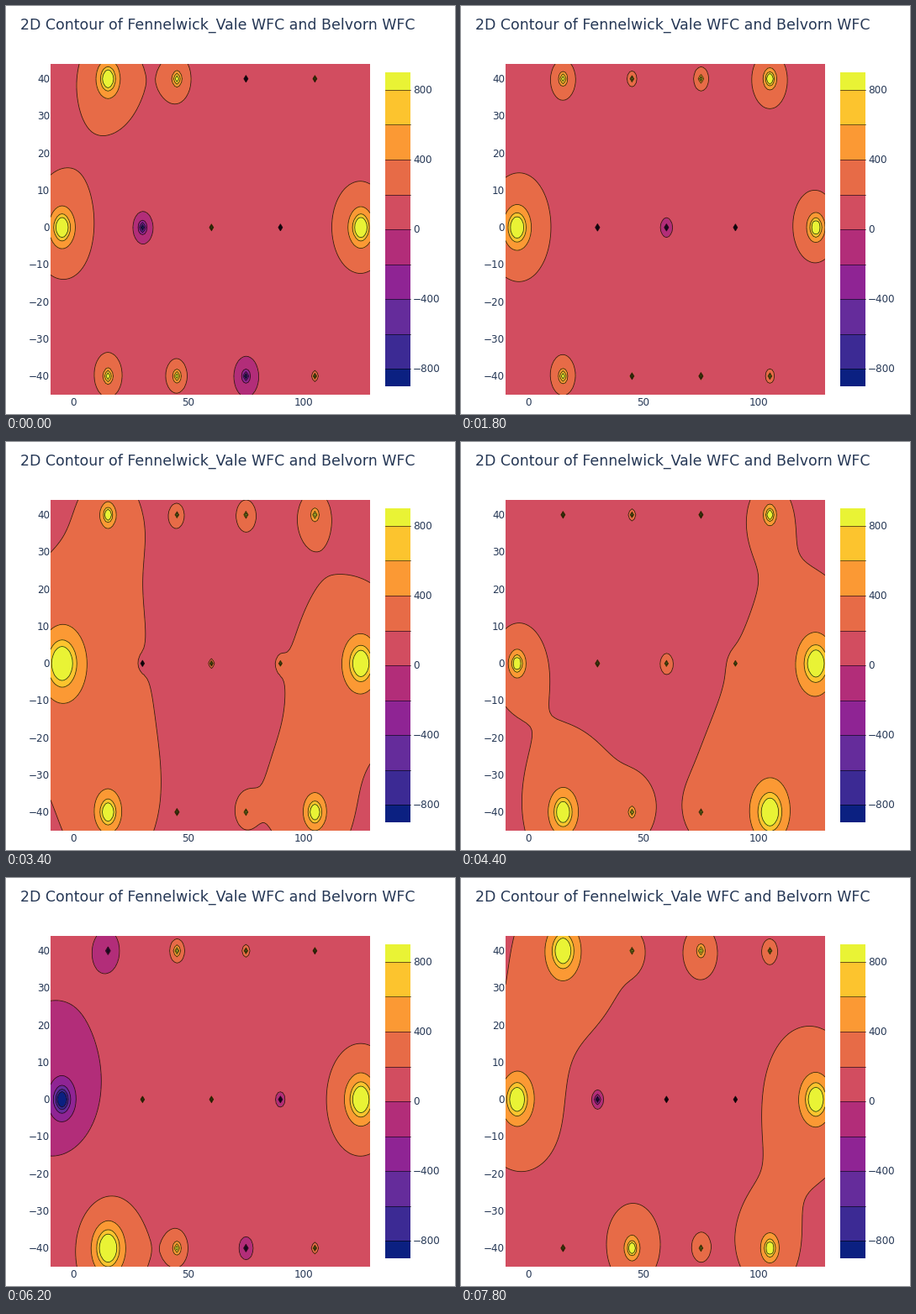
A matplotlib script that plays this animation: 534x486 px, repeating every 8000 ms.

```python
import numpy as np
import matplotlib.pyplot as plt
from matplotlib.animation import FuncAnimation
from matplotlib.patches import Rectangle

W, H, DPI = 534, 486, 100
STEPS, STEP_MS = 40, 200
PX = 72 / DPI  # points per pixel
INK = "#253755"
LEVELS = np.arange(-800, 801, 200)
COLORS = ["#0b2081", "#3c2a94", "#652c9b", "#8f2494", "#b22d79",
          "#d24d60", "#e76b47", "#fb9934", "#fcc42e", "#e9f335"]
LEFT, TOP, RIGHT, BOTTOM = 53, 69, 433, 463

# Stations on the pitch: left and right goal, top, centre and bottom rows.
STATIONS = {"L": (-5, 0), "R": (125, 0)}
for i in range(4):
    STATIONS[f"T{i + 1}"] = (15 + 30 * i, 40)
    STATIONS[f"B{i + 1}"] = (15 + 30 * i, -40)
for i in range(3):
    STATIONS[f"C{i + 1}"] = (30 + 30 * i, 0)

# Notable strengths at the key steps; every other station is weak.
WEAK = 30
KEYS = {
    0: dict(L=1920, R=2020, T1=1690, T2=650, T3=-WEAK, C1=-670, C3=-WEAK,
            B1=690, B2=590, B3=-560, B4=170),
    6: dict(L=170, R=590, T1=-160, T2=260, T3=280, T4=1540, C1=-150,
            C2=-455, C3=-75, B1=140, B2=260),
    13: dict(L=4800, R=2430, T1=1640, T2=150, T3=400, T4=205, C1=-75,
             C2=-WEAK, B1=1340, B2=-260, B3=205, B4=500),
    22: dict(L=1140, R=2470, T2=120, T4=790, C2=110, B1=1960, B2=340,
             B3=130, B4=2540),
    26: dict(L=-810, R=1450, T1=-WEAK, T2=-WEAK, C1=-570, C2=-WEAK,
             C3=-WEAK, B1=370, B2=410, B4=335),
    31: dict(L=-1850, R=2740, T1=-250, T2=520, T3=210, C3=-230, B1=2980,
             B2=545, B3=-300, B4=170),
    39: dict(L=2260, R=2310, T1=2370, T2=200, T3=490, T4=217, C1=-500,
             C2=-WEAK, C3=-WEAK, B2=985, B3=170, B4=1150),
}

xs, ys = np.arange(-10, 130), np.arange(-45, 45)
gx, gy = np.meshgrid(xs, ys)


def potential(step):
    """Sum of strength / distance over all stations, capped at +-1000."""
    field = np.zeros(gx.shape)
    for name, (x, y) in STATIONS.items():
        q = np.interp(step, list(KEYS),
                      [key.get(name, WEAK) for key in KEYS.values()])
        field += q / np.maximum(np.hypot(gx - x, gy - y), 0.005)
    return field.clip(-1000, 1000)


fig = plt.figure(figsize=(W / DPI, H / DPI), dpi=DPI, facecolor="white")
plt.rcParams["font.family"] = "DejaVu Sans"

# Page layer in pixels, origin at the top left.
page = fig.add_axes([0, 0, 1, 1])
page.set(xlim=(0, W), ylim=(H, 0))
page.axis("off")


def label(x, y, text, size=12, ha="left"):
    page.text(x, y, str(text).replace("-", "\u2212"), fontsize=size * PX,
              color=INK, ha=ha, va="baseline")


def bar_y(value):
    return 266 - value * 41.5 / 200


label(17, 28, "2D Contour of Fennelwick_Vale WFC and Belvorn WFC", 17.35)
for v in range(0, 101, 50):
    label(LEFT + (v + 10) * (RIGHT - LEFT) / 139, 475.7, v, ha="center")
for v in range(-40, 41, 10):
    label(52, TOP + (44 - v) * (BOTTOM - TOP) / 89 + 4.3, v, ha="right")

# Colour bar: one block per band, a thin line at every level.
edges = bar_y(np.arange(-900, 901, 100))[[0, *range(1, 18, 2), 18]]
for low, high, color in zip(edges, edges[1:], COLORS):
    page.add_patch(Rectangle((451, high), 30, low - high, color=color, lw=0))
for v in LEVELS:
    page.plot([451, 481], [bar_y(v)] * 2, color="black", lw=0.7 * PX,
              alpha=0.8)
for v in range(-800, 801, 400):
    label(484, bar_y(v) + 4.3, v)

ax = fig.add_axes([LEFT / W, 1 - BOTTOM / H,
                   (RIGHT - LEFT) / W, (BOTTOM - TOP) / H])
ax.set(xlim=(-10, 129), ylim=(-45, 44))
ax.axis("off")
drawn = []


def draw(step):
    while drawn:
        drawn.pop().remove()
    field = potential(step)
    drawn.append(ax.contourf(xs, ys, field, LEVELS, colors=COLORS,
                             extend="both"))
    drawn.append(ax.contour(xs, ys, field, LEVELS, colors="black",
                            linestyles="solid", linewidths=0.8 * PX,
                            alpha=0.8))
    return []


anim = FuncAnimation(fig, draw, frames=STEPS, interval=STEP_MS, repeat=True,
                     repeat_delay=0, init_func=lambda: draw(0))
plt.show()
```
